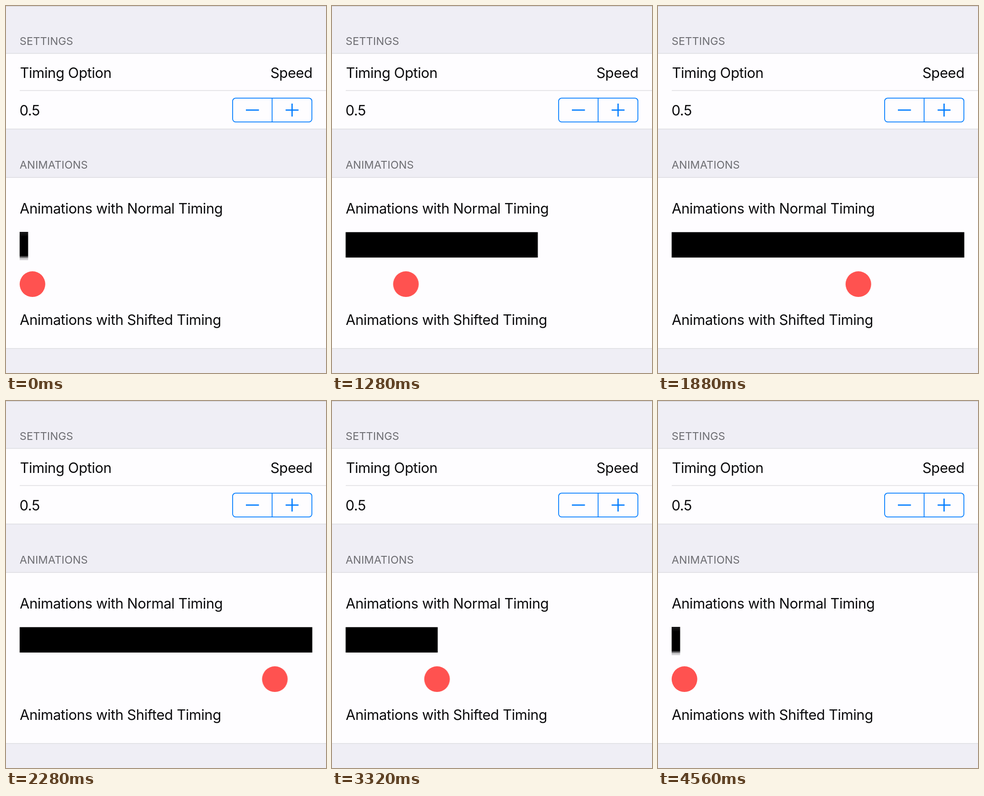
Recreate the animation shown at these times as an HTML page. Size 699 by 801 pixels, loop 4.6 s.

```html
<!DOCTYPE html>
<html lang="en">
<head>
<meta charset="utf-8">
<title>Timing settings</title>
<style>
  html, body { margin: 0; width: 100%; height: 100%; overflow: hidden; background: #efeef5; }
  svg { display: block; width: 699px; height: 801px; }
  text { font: 400 31px Inter, "Liberation Sans", sans-serif; letter-spacing: -.43px; fill: #0b0b0d; }
  .head { font-size: 23.5px; letter-spacing: .1px; fill: #6d6d72; }
  .panel { fill: #fefdff; }
  .rule { fill: none; stroke: #dcdbe0; stroke-width: 1.5; }
  .stepper { fill: none; stroke: #007cff; stroke-width: 1.8; }
  .sign { fill: none; stroke: #007cff; stroke-width: 2.8; }

  .bar { transform-origin: 29.8px 0; animation: grow 4.6s infinite; }
  .ball { fill: #ff5250; animation: slide 4.6s infinite; }

  /* Both return together; the ball takes twice as long to go out. */
  @keyframes grow {
    0% { transform: scaleX(.0292); }
    15.022% { transform: scaleX(.0292); animation-timing-function: ease-in-out; }
    36.891% { transform: scaleX(1); }
    58.913% { transform: scaleX(1); animation-timing-function: ease-in-out; }
    80.196%, 100% { transform: scaleX(.0292); }
  }
  @keyframes slide {
    0% { transform: translateX(0); }
    15.022% { transform: translateX(0); animation-timing-function: ease-in-out; }
    58.913% { transform: translateX(583.4px); animation-timing-function: ease-in-out; }
    80.196%, 100% { transform: translateX(0); }
  }
</style>
</head>
<body>
<svg viewBox="0 0 699 801">
  <rect class="panel" y="103.5" width="699" height="165"/>
  <rect class="panel" y="374.5" width="699" height="373"/>
  <path class="rule" d="M0 103.5H699M30 184.5H699M0 268.5H699M0 374.2H699M0 747.6H699"/>
  <path d="M0 .5H699" stroke="#c9c8cd"/>

  <text class="head" x="29.8" y="85">SETTINGS</text>
  <text x="30.4" y="156.5">Timing Option</text>
  <text x="577.4" y="156.5">Speed</text>
  <text x="29.5" y="239">0.5</text>

  <g class="stepper">
    <rect x="495.1" y="201.1" width="173.1" height="52" rx="6.5"/>
    <path d="M581.3 201V253.5"/>
  </g>
  <path class="sign" d="M524 227.1H552.5M610.8 227.1H639M624.9 213V241.2"/>

  <text class="head" x="29.8" y="355">ANIMATIONS</text>
  <text x="30" y="452.5">Animations with Normal Timing</text>
  <rect class="bar" x="29.8" y="493.6" width="639.3" height="55.4"/>
  <circle class="ball" cx="57.8" cy="607.1" r="28"/>
  <text x="30" y="695.5">Animations with Shifted Timing</text>
</svg>
</body>
</html>
```
